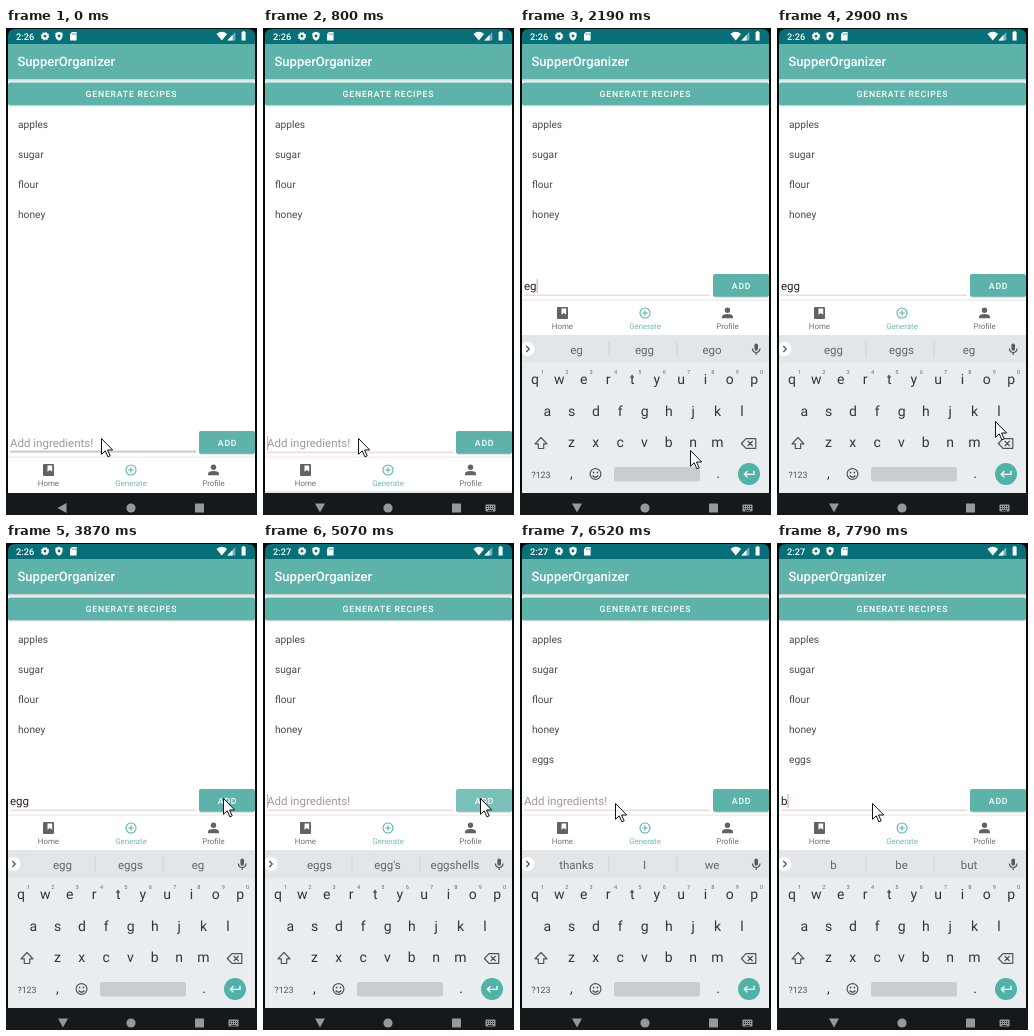
Animation, 251 px wide and 487 px high, one loop 8000 ms. Source, as an HTML page:

```html
<!DOCTYPE html>
<html lang="en">
<head>
<meta charset="utf-8">
<title>Ingredient list</title>
<style>
html, body { margin: 0; width: 100%; height: 100%; overflow: hidden; background: #080b0c; }
svg { display: block; width: 100vw; height: 100vh; font-family: Roboto, "Noto Sans", sans-serif; text-rendering: geometricPrecision; }
text { white-space: pre; }
.mid { text-anchor: middle; }
.btn { font-size: 8.7px; font-weight: 500; letter-spacing: .78px; fill: #fff; text-anchor: middle; }
.item { font-size: 10.2px; fill: #4a4a4a; }
.tab { font-size: 7.9px; text-anchor: middle; }
.key { font-size: 14px; fill: #30363a; text-anchor: middle; }
.hint { font-size: 5.6px; fill: #666d71; text-anchor: middle; }
.word { font-size: 11.5px; fill: #60676b; text-anchor: middle; }
.line { fill: none; stroke: #4d5458; stroke-width: 1.2; stroke-linejoin: round; }
</style>
</head>
<body>
<svg id="stage" viewBox="0 0 251 487" preserveAspectRatio="none"></svg>
<script>
const LOOP = 8000;
const TEAL = '#5db3a9';
const LIFT = 157;
const KEYBOARD = 160;

// Screen refresh times: the picture holds between them.
const spread = (from, to, n) => Array.from({ length: n }, (_, i) => from + (to - from) * i / (n - 1));
const ticks = [0, ...spread(560, 1100, 5), 1630, 2190, 2340, 2900, 3030, ...spread(3169, 3870, 6),
  4180, ...spread(4610, 5070, 4), ...spread(5220, 5650, 4), 5800, 5960, 6520, 6970, 7510, 7790];

const edits = [
  [560, ''], [1630, 'e'], [2190, 'eg'], [2340, 'egg'], [4180, 'eggs'], [4950, ''], [7790, 'b']
];
const hints = [
  [0, 'thanks I we'], [1630, 'e est even'], [2190, 'eg egg ego'], [2340, 'egg eggs eg'],
  [4180, "eggs egg's eggshells"], [5220, 'thanks I we'], [7790, 'b be but']
];
const path = [
  [0, 95, 410], [690, 95, 410], [1100, 170, 422], [2340, 170, 422], [2900, 218, 393],
  [3310, 238, 336], [3870, 217, 255], [5070, 217, 255], [5650, 95, 263], [5960, 95, 260], [LOOP, 95, 260]
];

const text = (cls, x, y, str, extra = '') => `<text class="${cls}" x="${x}" y="${y}" ${extra}>${str}</text>`;
const rect = (x, y, w, h, fill, extra = '') => `<rect x="${x}" y="${y}" width="${w}" height="${h}" fill="${fill}" ${extra}/>`;
const shape = (d, fill, extra = '') => `<path d="${d}" fill="${fill}" ${extra}/>`;
const line = d => `<path class="line" d="${d}"/>`;

function statusBar() {
  const teeth = `<circle cx="39" cy="8.2" r="2.4" fill="none" stroke="#fff" stroke-width="2"/>
    <circle cx="39" cy="8.2" r="3.6" fill="none" stroke="#fff" stroke-width="1.1" stroke-dasharray="1.5 1.33"/>`;
  return rect(2, 1, 247, 15, '#066f77')
    + text('', 10, 12, '2:26', 'id="clock" font-size="9.2" font-weight="500" fill="#fff"') + teeth
    + shape('M53 3.7l3.6 1.4v2.7q0 3.4-3.6 5q-3.6-1.6-3.6-5V5.1z', '#fff')
    + '<circle cx="53" cy="8" r="1.4" fill="#066f77"/>'
    + shape('M66 4h4.6v8.4h-6.6V6z', '#fff')
    + shape('M66.3 5.3v1.8M67.9 5.3v1.8M69.4 5.3v1.8', 'none', 'stroke="#066f77" stroke-width=".6"')
    + shape('M210.5 6q5.3-4.3 10.6 0l-5.3 6.4z', '#fff')
    + shape('M229.3 4v8.4h-8z', '#fff', 'opacity=".45"') + shape('M226.5 7v5.4h-5.2z', '#fff')
    + shape('M235.6 4h1v-.9h2V4h1v8.4h-4z', '#fff');
}

function page() {
  const items = ['apples', 'sugar', 'flour', 'honey', 'eggs'];
  return rect(2, 15, 247, 450, '#fff')
    + rect(2, 50, 247, 4, 'url(#shade)') + rect(2, 15.5, 247, 35.5, TEAL)
    + text('', 11.5, 38, 'SupperOrganizer', 'font-size="13" font-weight="500" fill="#fff"')
    + rect(2, 76, 247, 2.4, '#dfe3e2', 'rx="2"') + rect(2, 54.5, 247, 22.7, TEAL, 'rx="2"')
    + text('btn', 125.4, 69.2, 'GENERATE RECIPES')
    + items.map((s, i) => text('item', 12, 100.3 + 30 * i, s, i === 4 ? 'id="added"' : '')).join('');
}

function footer() {
  return rect(2, 400, 247, 65, '#fff')
    + text('', 4, 419.3, 'Add ingredients!', 'id="place" font-size="11.5" fill="#9b9b9b"')
    + text('', 4, 419.3, '', 'id="typed" font-size="11.5" fill="#222"')
    + rect(4, 422.6, 186, 2, '#c8c8c8', 'id="rule"')
    + rect(4, 408, 1.1, 14, '#ef9bab', 'id="caret"')
    + rect(193.3, 404.5, 55.5, 22.2, '#d8dddc', 'rx="2"') + rect(193, 403, 56, 22.7, TEAL, 'rx="2"')
    + text('btn', 221.6, 417.6, 'ADD')
    + rect(193, 403, 56, 22.7, '#fff', 'rx="2" id="press"')
    + rect(2, 428.5, 247, 1.3, '#ececec')
    + rect(37, 436, 11, 12, '#626262', 'rx="1"') + shape('M41.5 437.5h4.7v6.2l-2.35-1.6-2.35 1.6z', '#fff')
    + text('tab', 42.4, 458, 'Home', 'fill="#707070"')
    + `<circle cx="125" cy="442" r="5" fill="none" stroke="${TEAL}" stroke-width="1.1"/>`
    + shape('M125 439.2v5.6M122.2 442h5.6', 'none', `stroke="${TEAL}" stroke-width="1.1"`)
    + text('tab', 125, 458, 'Generate', 'fill="#6dbcb3"')
    + '<circle cx="207.5" cy="439.2" r="2.7" fill="#626262"/>'
    + shape('M202 447.3v-1.4q0-2.8 5.5-2.8t5.5 2.8v1.4z', '#626262')
    + text('tab', 207.5, 458, 'Profile', 'fill="#707070"');
}

function keyboard() {
  const row = (str, x, y) => [...str].map((c, i) => text('key', x + 24.35 * i, y, c)).join('');
  const digits = [...'1234567890'].map((c, i) => text('hint', 22.5 + 24.35 * i, 346, c)).join('');
  return rect(2, 307, 247, 158, '#e9edf0') + rect(2, 307, 247, 28, '#e2e6e9')
    + '<circle cx="7.5" cy="321" r="7" fill="#fff"/>' + line('M6.3 318l3 3-3 3')
    + [56.5, 124.5, 192].map((x, i) => text('word', x, 325.5, '', `id="hint${i}"`)).join('')
    + rect(88.5, 314, 1, 14, '#cbd0d3') + rect(156.5, 314, 1, 14, '#cbd0d3')
    + rect(234.4, 315.5, 3.6, 7.2, '#565d61', 'rx="1.8"') + line('M232.4 320.5q.3 4 3.8 4t3.8-4M236.2 324.5v2.5')
    + row('qwertyuiop', 15, 356.3) + digits + row('asdfghjkl', 27.2, 387.6) + row('zxcvbnm', 51.4, 419.4)
    + line('M21 409.5l6 6.3h-3.3v4.7h-5.4v-4.7H15z')
    + line('M226 410.7h9.8v9.6H226l-4.6-4.8zM227.7 413l5 5M232.7 413l-5 5')
    + text('mid', 21, 449.8, '?123', 'font-size="8.8" fill="#4d5458"')
    + text('key', 51.5, 449.5, ',') + text('key', 198, 449.5, '.')
    + '<circle class="line" cx="75.5" cy="446" r="5.4"/>' + line('M72.6 447.5q2.9 3.3 5.8 0')
    + '<circle cx="73.6" cy="444.5" r=".9" fill="#4d5458"/><circle cx="77.4" cy="444.5" r=".9" fill="#4d5458"/>'
    + rect(94, 439, 86, 14.5, '#c8cdd0', 'rx="2"')
    + '<circle cx="229" cy="446" r="11" fill="#4fb3a7"/>'
    + shape('M234 442.8v3.5h-9.5M227.5 443.2l-3.2 3.1 3.2 3.1', 'none', 'stroke="#fff" stroke-width="1.3"');
}

function systemBar() {
  const gray = '#94999b';
  const dots = [224, 226, 228, 230].map(x => rect(x, 478, 1, 1, '#15191b') + rect(x, 480, 1, 1, '#15191b')).join('');
  return rect(0, 465, 251, 22, '#15191b')
    + shape('M60.5 475v10l-9-5z', gray, 'id="back"') + shape('M52 475.5h10l-5 9z', gray, 'id="down"')
    + `<circle cx="125" cy="480" r="4.6" fill="${gray}"/>` + rect(189, 475.5, 9, 9, gray, 'rx=".6"')
    + `<g id="switch">${rect(222.5, 476.5, 10, 7, gray, 'rx=".8"')}${dots}${rect(225, 482, 5, .8, '#15191b')}</g>`;
}

const stage = document.getElementById('stage');
stage.innerHTML = `<defs>
  <linearGradient id="shade" x2="0" y2="1"><stop stop-color="#b9c4c2"/><stop offset="1" stop-color="#f4f6f6"/></linearGradient>
  <clipPath id="phone"><path d="M2 487V8q0-7 7-7h233q7 0 7 7v479z"/></clipPath></defs>
  <rect width="251" height="487" fill="#080b0c"/>
  <g clip-path="url(#phone)">${page()}${statusBar()}<g id="footer">${footer()}</g>
  <g id="keys">${keyboard()}</g></g>${systemBar()}
  <path id="mouse" d="M.5.5v15.8l3.7-3.5 2.7 6 2.3-1-2.7-5.8h5.2z" fill="#fff" stroke="#111" stroke-width="1"/>`;

const el = {};
stage.querySelectorAll('[id]').forEach(node => el[node.id] = node);
const show = (node, on) => node.setAttribute('visibility', on ? 'visible' : 'hidden');
const shift = (node, x, y) => node.setAttribute('transform', `translate(${x} ${y})`);
const latest = (list, t) => list.filter(e => e[0] <= t).pop();

function mouseAt(t) {
  const i = path.findIndex(p => p[0] > t);
  const [a, b] = [path[i - 1], path[i]];
  const u = (t - a[0]) / (b[0] - a[0]);
  const k = u * u * (3 - 2 * u);
  return [a[1] + (b[1] - a[1]) * k, a[2] + (b[2] - a[2]) * k];
}

function draw(time) {
  const t = ticks.filter(v => v <= time).pop();
  const [since, value] = latest(edits, t) || [0, ''];
  const focused = t >= 560;
  const raised = t >= 830;

  el.clock.textContent = t < 4950 ? '2:26' : '2:27';
  show(el.added, t >= 5220);
  shift(el.footer, 0, raised ? -LIFT : 0);
  const rise = Math.min(1, Math.max(0, (t - 690) / 410));
  shift(el.keys, 0, KEYBOARD * (1 - rise) ** 2);
  show(el.keys, rise > 0);

  show(el.place, !value);
  el.typed.textContent = value;
  el.rule.setAttribute('fill', focused ? '#f2cdd4' : '#c8c8c8');
  el.rule.setAttribute('height', focused ? 1.2 : 2);
  el.rule.setAttribute('y', focused ? 423.6 : 422.6);
  el.caret.setAttribute('x', 4 + (value ? el.typed.getComputedTextLength() : 0));
  show(el.caret, focused && (t - since) % 1000 < 500);

  latest(hints, t)[1].split(' ').forEach((s, i) => el['hint' + i].textContent = s);
  const press = t < 4610 || t >= 5510 ? 0 : Math.min(1, (t - 4500) / 260, (5510 - t) / 300);
  el.press.setAttribute('opacity', press * .17);

  show(el.back, t < 690);
  show(el.down, t >= 690);
  show(el.switch, t >= 690);
  shift(el.mouse, ...mouseAt(t));
}

const start = performance.now();
function loop() {
  draw((performance.now() - start) % LOOP);
  requestAnimationFrame(loop);
}
loop();
</script>
</body>
</html>
```
